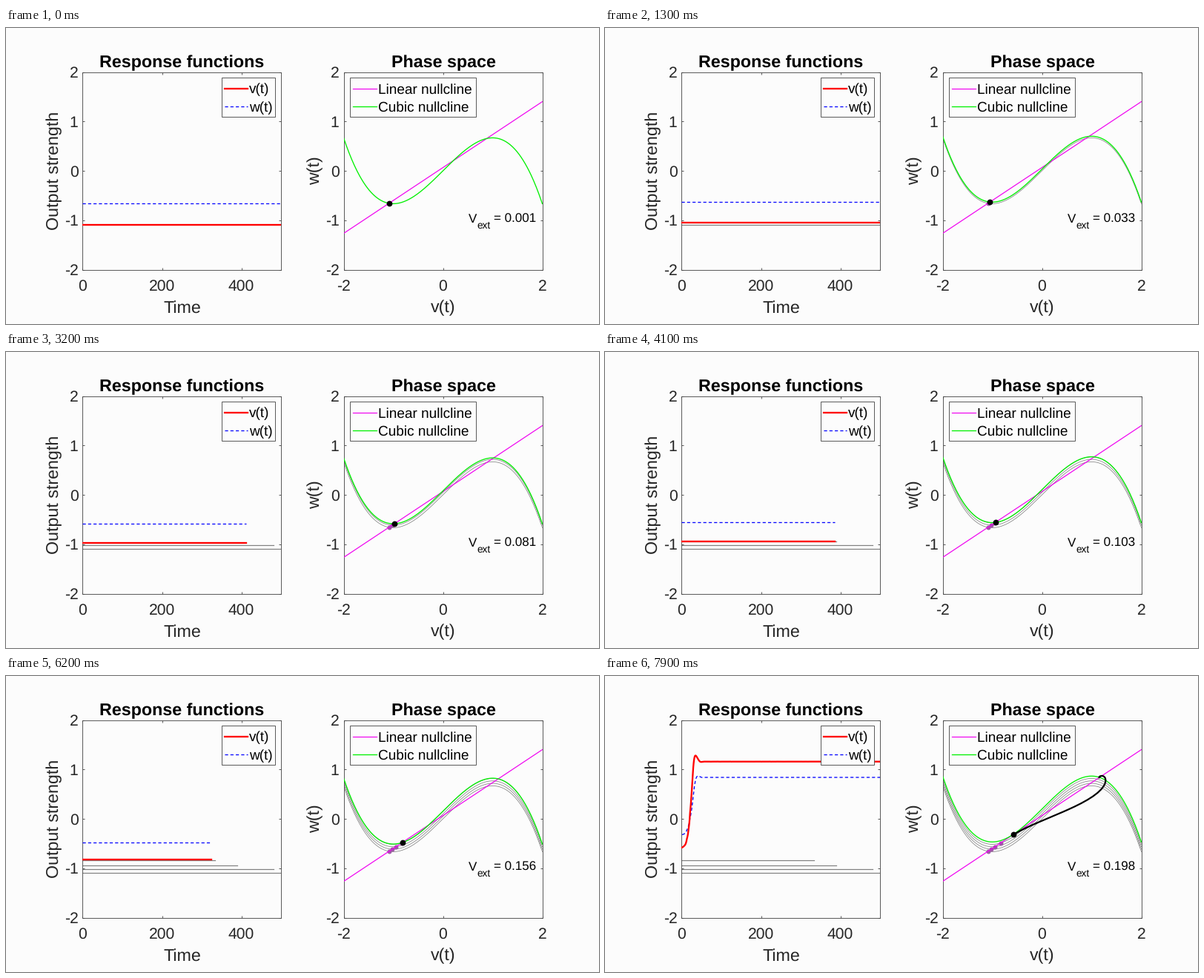
These frames come from a looping animation (800 by 400 pixels, 8000 ms). A matplotlib script:

```python
import numpy as np
import matplotlib.pyplot as plt
from matplotlib.animation import FuncAnimation
from matplotlib.patches import Rectangle

W, H, DPI = 800, 400, 100
FRAMES, INTERVAL = 80, 100
SAVE_EVERY = 20
PAPER, INK, EDGE = "#fcfcfc", "#262626", "#4a4a4a"
RED, BLUE, MAGENTA, GREEN = "#ff0000", "#0000ff", "#f000f0", "#00f000"
GREY, OLD_DOT = "#808080", "#a058a8"
A, B, EPS = 0.1, 1.5, 0.64

plt.rcParams["font.family"] = "Liberation Sans"
plt.rcParams["text.hinting"] = "none"


def pt(px):
    return px * 72 / DPI


# Model: v' = v - v^3/3 - w + I,  w' = EPS (v + A - B w)
def cubic(v, current):
    return v - v**3 / 3 + current


def linear(v):
    return (v + A) / B


def current_at(n):
    return 0.001 + 0.0025 * n


def rest_point(n):
    """Lowest fixed point, and whether it really exists."""
    roots = np.roots([1, 0, 3 / B - 3, 3 * A / B - 3 * current_at(n)])
    low = min(roots, key=lambda r: r.real)
    return low.real, linear(low.real), abs(low.imag) < 1e-9


# Dormand-Prince pair with four outputs per step
STAGES = [
    [1 / 5],
    [3 / 40, 9 / 40],
    [44 / 45, -56 / 15, 32 / 9],
    [19372 / 6561, -25360 / 2187, 64448 / 6561, -212 / 729],
    [9017 / 3168, -355 / 33, 46732 / 5247, 49 / 176, -5103 / 18656],
    [35 / 384, 0, 500 / 1113, 125 / 192, -2187 / 6784, 11 / 84],
]
ERROR = np.array([71 / 57600, 0, -71 / 16695, 71 / 1920,
                  -17253 / 339200, 22 / 525, -1 / 40])
DENSE = np.array([
    [1, -183 / 64, 37 / 12, -145 / 128],
    [0, 0, 0, 0],
    [0, 1500 / 371, -1000 / 159, 1000 / 371],
    [0, -125 / 32, 125 / 12, -375 / 64],
    [0, 9477 / 3392, -729 / 106, 25515 / 6784],
    [0, -11 / 7, 11 / 3, -55 / 28],
    [0, 3 / 2, -4, 5 / 2],
])


def integrate(start, current, samples=504, rtol=1e-3, floor=1e-3, h_max=40):
    def slope(y):
        return np.array([cubic(y[0], current) - y[1],
                         EPS * (y[0] + A - B * y[1])])

    y = np.array(start)
    out = [y]
    rate = np.max(np.abs(slope(y)) / np.maximum(np.abs(y), floor))
    h = min(h_max, 0.8 * rtol**0.2 / max(rate, 1e-9))
    while len(out) < samples:
        failed = False
        while True:
            k = [slope(y)]
            for row in STAGES:
                new = y + h * np.dot(row, k)
                k.append(slope(new))
            k = np.array(k)
            scale = np.maximum(np.maximum(np.abs(y), np.abs(new)), floor)
            err = h * np.max(np.abs(ERROR @ k) / scale)
            if err <= rtol:
                break
            h *= 0.5 if failed else max(0.1, 0.8 * (rtol / err) ** 0.2)
            failed = True
        for s in (0.25, 0.5, 0.75):
            out.append(y + h * (DENSE @ s ** np.arange(1, 5)) @ k)
        out.append(new)
        y = new
        if not failed:
            h = min(h_max, h / max(0.2, 1.25 * (err / rtol) ** 0.2))
    return np.array(out)


def solve(n):
    """Sample numbers with v and w along the response."""
    v, w, stable = rest_point(n)
    if not stable:
        with np.errstate(all="ignore"):
            path = integrate((v, w), current_at(n))
        return np.arange(1, len(path) + 1), path[:, 0], path[:, 1]
    end = np.interp(n, [0, 13, 20, 32, 40, 53, 62, 70, 74, 77],
                    [545, 506, 481, 413, 389, 361, 325, 266, 223, 137])
    return np.array([0, end]), np.array([v, v]), np.array([w, w])


runs = [solve(n) for n in range(FRAMES)]

fig = plt.figure(figsize=(W / DPI, H / DPI), dpi=DPI, facecolor=PAPER)


def panel(x0, x1, xlim, xticks):
    y0, y1 = 59.5, 326.5
    ax = fig.add_axes([x0 / W, 1 - y1 / H, (x1 - x0) / W, (y1 - y0) / H])
    ax.set(xlim=xlim, ylim=(-2, 2), xticks=xticks, yticks=range(-2, 3),
           facecolor=PAPER)
    ax.tick_params(direction="in", length=pt(3), width=pt(0.9), color=EDGE,
                   top=True, right=True, labelbottom=False, labelleft=False)
    for spine in ax.spines.values():
        spine.set(linewidth=pt(0.9), color=EDGE)
    for value in range(-2, 3):
        y = y1 - (value + 2) * (y1 - y0) / 4
        label(x0 - 6, y + 7.7, value, 21.2, "right")
    for value in xticks:
        x = x0 + (value - xlim[0]) / (xlim[1] - xlim[0]) * (x1 - x0)
        label(x, 355, value, 21.2)
    return ax


def label(x, y, text, size, ha="center", **style):
    style = {"color": INK, **style}
    return ui.text(x, y, str(text), fontsize=pt(size), ha=ha, va="baseline",
                   rotation_mode="anchor", **style)


def legend(x0, x1, sample, text_x, rows):
    ui.add_patch(Rectangle((x0, 67), x1 - x0, 52.5, facecolor=PAPER,
                           edgecolor=EDGE, linewidth=pt(0.9)))
    for (text, style), y in zip(rows, (81.5, 106)):
        ui.plot(sample, (y, y), **style)
        label(text_x, y + 7, text, 19.05, "left", color="black")


# Pixel-based layer for text and legends
ui = fig.add_axes([0, 0, 1, 1], zorder=10)
ui.set(xlim=(0, W), ylim=(H, 0))
ui.axis("off")
ui.set_autoscale_on(False)

time_ax = panel(103.5, 371, (0, 500), (0, 200, 400))
phase_ax = panel(455.5, 723.5, (-2, 2), (-2, 0, 2))

V_STYLE = dict(color=RED, lw=pt(2.3))
W_STYLE = dict(color=BLUE, lw=pt(1.3), ls=(0, (3.2, 2.4)), dash_capstyle="butt")
LINEAR_STYLE = dict(color=MAGENTA, lw=pt(1.2))
CUBIC_STYLE = dict(color=GREEN, lw=pt(1.3))

label(237.5, 53, "Response functions", 23.3, weight="bold", color="black")
label(590, 53, "Phase space", 23.3, weight="bold", color="black")
label(237.5, 384.5, "Time", 23.3)
label(590, 384.5, "v(t)", 23.3)
label(71, 193, "Output strength", 23.3, rotation=90)
label(423, 193, "w(t)", 23.3, rotation=90)
legend(290.5, 363, (294.5, 325.5), 328,
       [("v(t)", V_STYLE), ("w(t)", W_STYLE)])
legend(463.5, 633.5, (467.5, 499.5), 501.5,
       [("Linear nullcline", LINEAR_STYLE), ("Cubic nullcline", CUBIC_STYLE)])
label(624, 263, "V", 17, "left", color="black")
label(635.5, 270.5, "ext", 13.6, "left", color="black")
readout = label(658, 263, "", 17, "left", color="black")
ui.plot((0, W), (399.5, 399.5), color="#b4b4b4", lw=pt(1))

grid = np.linspace(-2, 2, 300)
history = []
for n in range(0, FRAMES, SAVE_EVERY):
    t, v, w = runs[n]
    history.append((n, [
        *time_ax.plot(t, v, color=GREY, lw=pt(1.2), zorder=2),
        *phase_ax.plot(grid, cubic(grid, current_at(n)), color=GREY,
                       lw=pt(0.75), zorder=2),
        *phase_ax.plot(v[:1], w[:1], "o", color=OLD_DOT, ms=pt(6), mew=0,
                       zorder=2.1),
    ]))

phase_ax.plot(grid, linear(grid), zorder=3, **LINEAR_STYLE)
cubic_line, = phase_ax.plot([], [], zorder=4, **CUBIC_STYLE)
orbit, = phase_ax.plot([], [], color="black", lw=pt(2.2), zorder=5)
dot, = phase_ax.plot([], [], "o", color="black", ms=pt(7.8), mew=0, zorder=6)
v_line, = time_ax.plot([], [], zorder=4, **V_STYLE)
w_line, = time_ax.plot([], [], zorder=3, **W_STYLE)


def update(n):
    t, v, w = runs[n]
    v_line.set_data(t, v)
    w_line.set_data(t, w)
    orbit.set_data(v, w)
    dot.set_data(v[:1], w[:1])
    cubic_line.set_data(grid, cubic(grid, current_at(n)))
    readout.set_text(f"= {(10 + 25 * n) // 10 / 1000:.3f}")
    for saved, artists in history:
        for artist in artists:
            artist.set_visible(saved < n)
    return []


anim = FuncAnimation(fig, update, frames=FRAMES, interval=INTERVAL,
                     repeat=True, repeat_delay=0, blit=False)
plt.show()
```
